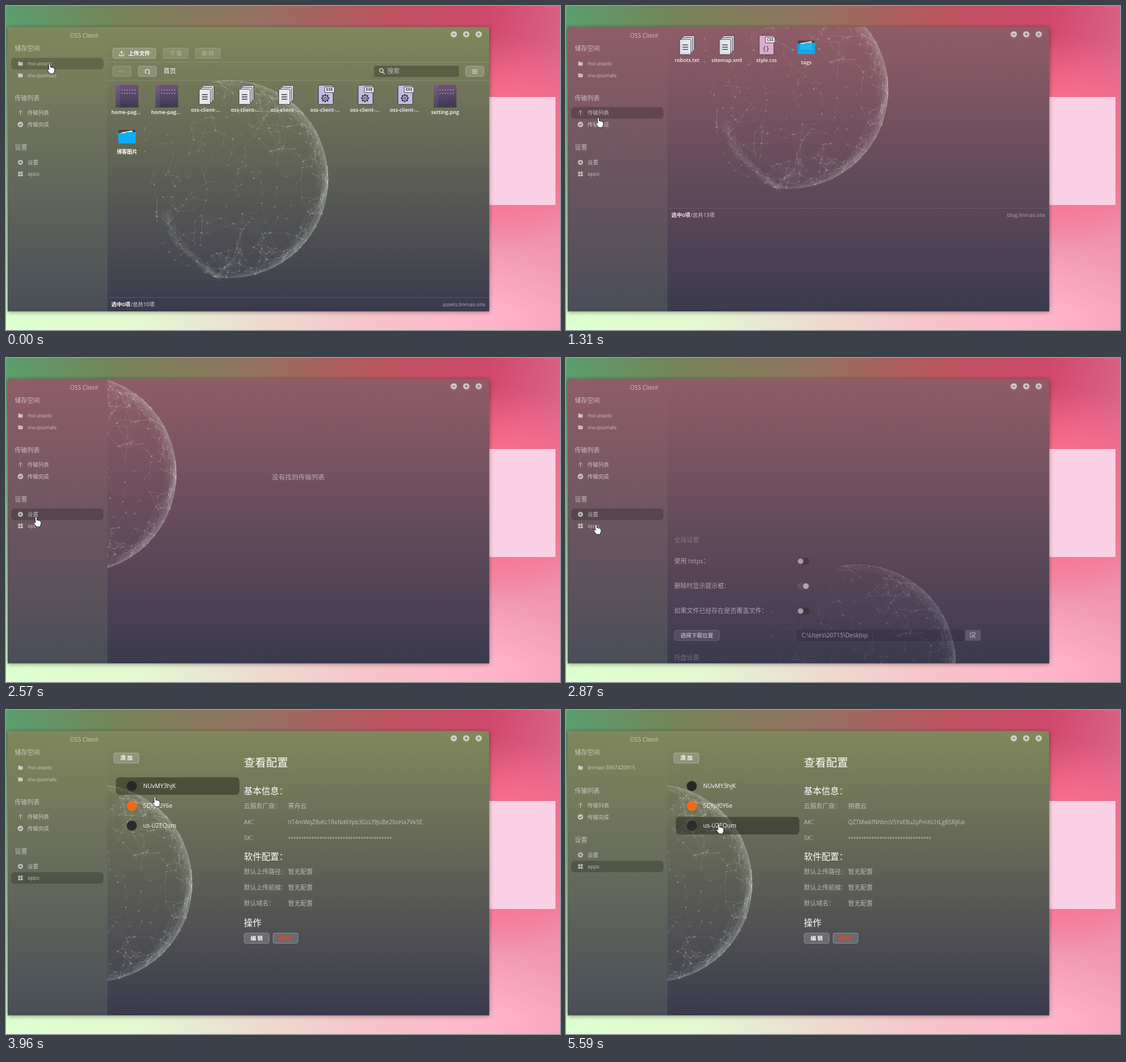
Animation, 978 px wide and 573 px high, one loop 5990 ms. Source, as an HTML page with a canvas:

```html
<!DOCTYPE html>
<html lang="zh">
<head>
<meta charset="utf-8">
<title>OSS Client</title>
<style>
html, body { margin: 0; width: 100%; height: 100%; overflow: hidden; }
canvas { display: block; }
</style>
</head>
<body>
<canvas id="stage" width="978" height="573"></canvas>
<script>
const W = 978, H = 573, LOOP = 5990;
const WIN = { x: 3, y: 37, w: 850, h: 503 }, SIDE = 179;
const OLIVE = '#81875c', RED = '#8f5d68', PURPLE = '#805b88';
const screen = document.getElementById('stage').getContext('2d');
let ctx = screen;

const white = a => `rgba(255,255,255,${a})`;
const black = a => `rgba(0,0,0,${a})`;

function layer(w, h, paint) {
  const c = document.createElement('canvas');
  c.width = w;
  c.height = h;
  paint(c.getContext('2d'));
  return c;
}

function random(seed) {
  return () => {
    seed = (seed + 0x6D2B79F5) | 0;
    let v = Math.imul(seed ^ (seed >>> 15), 1 | seed);
    v = (v + Math.imul(v ^ (v >>> 7), 61 | v)) ^ v;
    return ((v ^ (v >>> 14)) >>> 0) / 4294967296;
  };
}

function ramp(grad, stops) {
  stops.forEach(([p, c]) => grad.addColorStop(p, c));
  return grad;
}

// CSS "ease"
function ease(x) {
  if (x <= 0) return 0;
  if (x >= 1) return 1;
  let lo = 0, hi = 1;
  const curve = (u, a, b) => 3 * (1 - u) * (1 - u) * u * a + 3 * (1 - u) * u * u * b + u * u * u;
  for (let i = 0; i < 18; i++) {
    const mid = (lo + hi) / 2;
    if (curve(mid, .25, .25) < x) lo = mid; else hi = mid;
  }
  return curve(lo, .1, 1);
}

function text(str, x, y, size, color = '#fff', align = 'left', weight = 400) {
  ctx.font = `${weight} ${size}px "Open Sans","Noto Sans CJK SC","Noto Sans CJK",sans-serif`;
  ctx.textAlign = align;
  ctx.fillStyle = color;
  ctx.fillText(str, x, y + size * .36);
}

function box(x, y, w, h, r, fill, stroke) {
  ctx.beginPath();
  ctx.roundRect(x, y, w, h, r);
  if (fill) { ctx.fillStyle = fill; ctx.fill(); }
  if (stroke) { ctx.strokeStyle = stroke; ctx.lineWidth = 1; ctx.stroke(); }
}

function dot(x, y, r, fill) {
  ctx.beginPath();
  ctx.arc(x, y, r, 0, 7);
  ctx.fillStyle = fill;
  ctx.fill();
}

function path(d, x, y, { fill, stroke, width = 1 }) {
  ctx.save();
  ctx.translate(x, y);
  const p = new Path2D(d);
  ctx.lineJoin = ctx.lineCap = 'round';
  if (fill) { ctx.fillStyle = fill; ctx.fill(p); }
  if (stroke) { ctx.strokeStyle = stroke; ctx.lineWidth = width; ctx.stroke(p); }
  ctx.restore();
}

function button(x, y, w, label, color = '#fff', on = true) {
  box(x + .5, y + .5, w - 1, 18, 3, white(on ? .16 : .1), white(on ? .3 : .2));
  if (label) text(label, x + w / 2, y + 9.5, 9.6, color, 'center', on ? 600 : 400);
}

function gear(x, y, r, color, hole, inner = .36) {
  for (let i = 0; i < 8; i++) {
    ctx.save();
    ctx.translate(x, y);
    ctx.rotate(i * Math.PI / 4);
    ctx.fillStyle = color;
    ctx.fillRect(-r * .2, -r, r * .4, r);
    ctx.restore();
  }
  dot(x, y, r * .78, color);
  dot(x, y, r * inner, hole);
}

const wallpaper = layer(W, H, g => {
  g.fillStyle = ramp(g.createLinearGradient(0, 0, W, 0), [
    [0, '#5a9f6c'], [.2, '#74835a'], [.46, '#95705f'], [.7, '#bd515f'], [.87, '#cf486a'], [1, '#da6084']]);
  g.fillRect(0, 0, W, H);
  const low = layer(W, H, b => {
    b.fillStyle = ramp(b.createLinearGradient(0, 0, W, 0), [
      [0, '#dcffd0'], [.24, '#e4f8d2'], [.45, '#ecdcd2'], [.66, '#f8c3ca'], [.87, '#ffb4ca'], [1, '#f7a7bf']]);
    b.fillRect(0, 0, W, H);
    b.globalCompositeOperation = 'destination-in';
    b.fillStyle = ramp(b.createLinearGradient(0, 0, 0, H), [
      [0, black(0)], [.1, black(.03)], [.5, black(.45)], [.94, black(1)], [1, black(1)]]);
    b.fillRect(0, 0, W, H);
  });
  g.drawImage(low, 0, 0);
  g.fillStyle = ramp(g.createRadialGradient(880, 240, 30, 880, 240, 190), [
    [0, 'rgba(255,125,155,.9)'], [.5, 'rgba(255,110,140,.6)'], [1, 'rgba(255,100,135,0)']]);
  g.fillRect(680, 40, W - 680, 420);
  g.fillStyle = '#fbd0e4';
  g.fillRect(779, 161, 191, 191);
});

const globe = layer(440, 440, g => {
  const rnd = random(41), R = 175, pts = [];
  g.translate(220, 220);
  const tint = a => `rgba(225,230,225,${a})`;
  const line = (x1, y1, x2, y2, a) => {
    g.strokeStyle = tint(a);
    g.lineWidth = .7;
    g.beginPath();
    g.moveTo(x1, y1);
    g.lineTo(x2, y2);
    g.stroke();
  };
  const rim = (r, width, a, from, to) => {
    g.strokeStyle = tint(a);
    g.lineWidth = width;
    g.beginPath();
    g.arc(0, 0, r, from, to);
    g.stroke();
  };

  for (let i = 0; i < 470; i++) {
    const z = rnd(), a = rnd() * Math.PI * 2, r = R * Math.sqrt(1 - z * z);
    const x = r * Math.cos(a), y = r * Math.sin(a), keep = rnd();
    if (x < -152 || (x < -25 && y < 60 && r > 142 && keep > .12)) continue;
    if (x < -60 && y >= 60 && r > 150 && keep > .25) continue;
    if (x < 0 && keep > .75) continue;
    pts.push([x, y]);
  }
  pts.forEach(([x, y], i) => {
    for (let j = 0; j < i; j++) {
      const d = Math.hypot(x - pts[j][0], y - pts[j][1]);
      if (d < 36 && rnd() < .42) line(x, y, ...pts[j], .17 - d * .0022);
    }
    g.fillStyle = tint(.12 + rnd() * .22);
    g.beginPath();
    g.arc(x, y, .8 + rnd() * .8, 0, 7);
    g.fill();
  });

  // soft crescent along the right edge
  g.shadowColor = white(.4);
  g.shadowBlur = 18;
  rim(R - 1, 1.6, .22, -1.75, 1.75);
  g.shadowBlur = 6;
  rim(R - 3, 5, .1, -1.3, 1.5);
  rim(R - 6, 11, .07, -.95, 1.15);
  g.shadowBlur = 0;
  for (let i = 0; i < 420; i++) {
    const a = -1.75 + rnd() * 3.5, b = a + (rnd() - .5) * .26, thick = 6 + 16 * Math.cos(a * .75);
    const r = R - rnd() * thick, q = R - rnd() * thick;
    line(r * Math.cos(a), r * Math.sin(a), q * Math.cos(b), q * Math.sin(b), .11);
  }
  // ragged lower left edge
  const edge = u => {
    const v = 1 - u, s = 14 - u * 4;
    return [-119 * v * v - 206 * u * v - 22 * u * u + (rnd() - .3) * s * 1.6,
      58 * v * v + 246 * u * v + 176 * u * u + (rnd() - .6) * s];
  };
  for (let i = 0; i < 190; i++) {
    const u = rnd();
    line(...edge(u), ...edge(Math.min(1, u + rnd() * .14)), .14);
  }
});

const drawGlobe = x => ctx.drawImage(globe, x - 220, 86);

const icons = {
  thumb(x, y) {
    ctx.fillStyle = ramp(ctx.createLinearGradient(0, y - 20, 0, y + 20), [[0, '#71507c'], [1, '#3b394d']]);
    ctx.fillRect(x - 20, y - 20, 40, 40);
    ctx.fillStyle = white(.07);
    ctx.fillRect(x - 20, y - 20, 8, 40);
    for (let i = 0; i < 12; i++) {
      ctx.fillStyle = i % 3 ? white(.45) : '#4ab4e0';
      ctx.fillRect(x - 10 + (i % 6) * 4.6, y - 12 + Math.floor(i / 6) * 6, 2, 2);
    }
  },
  stack(x, y) {
    for (let i = 2; i >= 0; i--) box(x - 13 + i * 3, y - 10 - i * 3.2, 20, 27, 1.5, '#e6e8ee', '#33343f');
    for (let i = 0; i < 3; i++) {
      ctx.fillStyle = '#33343f';
      ctx.fillRect(x - 8, y - 1 + i * 4, 10, 1.5);
    }
  },
  card(x, y, fill, tag) {
    box(x - 13, y - 17, 26, 34, 1.5, fill, '#33343f');
    box(x - 2, y - 14, 17, 10, 1, '#f2f2f6', '#33343f');
    text(tag, x + 6.5, y - 9, 6.5, '#22222c', 'center', 700);
  },
  exe(x, y) {
    const fill = '#c8bce0';
    icons.card(x, y, fill, 'EXE');
    gear(x - 1, y + 6, 7, '#33343f', fill, .6);
    dot(x - 1, y + 6, 2.5, '#33343f');
    dot(x - 1, y + 6, 1.4, fill);
  },
  css(x, y) {
    icons.card(x, y, '#e3b6d6', 'CSS');
    text('{ }', x - 1, y + 6, 10, '#33343f', 'center', 600);
  },
  folder(x, y) {
    box(x - 15, y - 12, 30, 20, 1.5, '#4a4046');
    path('M-11-7L9-11L12 4H-11Z', x, y, { fill: '#f4f4f4' });
    path('M-16-6H-4L-1-8H16L15 12H-15Z', x, y, { fill: '#0baef5' });
  }
};

const staticFiles = [
  ['home-pag...', 'thumb'], ['home-pag...', 'thumb'],
  ...Array(3).fill(['oss-client-...', 'stack']),
  ...Array(3).fill(['oss-client-...', 'exe']),
  ['setting.png', 'thumb'], ['博客图片', 'folder']
];
const blogFiles = [
  ['404.html', 'stack'], ['about', 'folder'], ['archives', 'folder'], ['categories', 'folder'],
  ['css', 'folder'], ['images', 'folder'], ['index.html', 'stack'], ['js', 'folder'], ['page', 'folder'],
  ['robots.txt', 'stack'], ['sitemap.xml', 'stack'], ['style.css', 'css'], ['tags', 'folder']
];

function filesPage(t) {
  const blog = t >= 750, files = blog ? blogFiles : staticFiles;
  drawGlobe(394);
  button(188, 74, 77);
  text('上传文件', 216, 83.5, 9.6, '#fff', 'left', 600);
  path('M0 2V-4M-2.5-1.5L0-4L2.5-1.5M-4 1V4H4V1', 204, 84, { stroke: '#fff' });
  button(277, 74, 45, '下 载', white(.35), false);
  button(334, 74, 45, '删 除', white(.35), false);
  button(188, 106, 33, '', '#fff', false);
  path('M4 0H-4M-1.5-2.5L-4 0L-1.5 2.5', 204, 116, { stroke: white(.25) });
  button(233, 106, 33);
  path('M-2 3.2A3.8 3.8 0 1 1 2 3.2M2 3.6H4', 249.5, 116, { stroke: white(.9), width: 1.2 });
  text('首页', 278, 115.5, 11, '#fff', 'left', 500);
  box(650, 106, 149, 19, 3, black(.24), black(.12));
  path('M3 0A3.3 3.3 0 1 1 3 -.1M1.8 2.6L5 6', 663, 114, { stroke: white(.8), width: 1.4 });
  text('搜索', 673, 115.5, 11, white(.6));
  button(811, 106, 33);
  path('M-4-3H4M-4 0H4M-4 3H4', 827.5, 116, { stroke: white(.9) });
  ctx.fillStyle = white(.13);
  for (const y of [99, 131, 515]) ctx.fillRect(SIDE, y, 674, 1);

  files.forEach(([name, kind], i) => {
    const x = 213.6 + (i % 9) * 70.2, y = 157 + Math.floor(i / 9) * 70;
    const tall = kind === 'thumb' || kind === 'folder', cut = name.endsWith('...');
    icons[kind](x, y + (kind === 'thumb' ? 2.5 : kind === 'folder' ? 4 : 0));
    text(name, cut ? x - 27.5 : x, y + (tall ? 31 : 27), 9.1, '#fff', cut ? 'left' : 'center', 600);
  });
  text('选中0项', 186, 528, 9.4, '#fff', 'left', 600);
  text(`/总共${files.length}项`, 220, 528, 9.4, white(.85));
  text(blog ? 'blog.linmao.site' : 'assets.linmao.site', 846, 528, 9.1, white(.6), 'right');
}

function emptyPage() {
  drawGlobe(126);
  text('没有找到传输列表', 516, 312, 11.7, white(.55), 'center');
}

function toggle(y, on) {
  box(408, y - 6, 22, 12, 6, on ? white(.14) : black(.35));
  dot(on ? 423.5 : 414, y, 5, '#f4f4f0');
}

function settingsPage() {
  drawGlobe(513);
  [['全局设置', 88], ['托盘设置', 296], ['悬浮窗设置', 415]].forEach(([s, y]) => text(s, 191, y, 11, white(.48)));
  [['使用 https：', 125, 0], ['删除时显示提示框：', 169, 1], ['如果文件已经存在是否覆盖文件：', 213, 0],
    ['传输完成后是否提示：', 341, 1], ['复制url或者markdown格式：', 378.5, 1], ['是否显示悬浮窗：', 459.5, 1]
  ].forEach(([s, y, on]) => {
    text(s, 191, y, 11);
    toggle(y + .5, on);
  });
  button(191, 247, 80, '选择下载位置');
  box(408.5, 247.5, 296, 18, 2, black(.22), black(.25));
  text('C:\\Users\\20715\\Desktop', 416, 256.5, 10.3);
  box(704, 247, 28, 19, 2, white(.28));
  path('M4-1V-4H-4V4H-1M0 0L4.5 4.5M0 3.5V0H3.5', 718, 256, { stroke: '#fff', width: 1.1 });
  text('悬浮窗样式：', 191, 496.5, 11);
  dot(414, 497, 6.2, '#ecece6');
  text('圆形', 426, 496.5, 11);
  dot(467, 497, 6.2, '#fff');
  dot(467, 497, 4.1, '#2f7fd3');
  text('椭圆形', 479, 496.5, 11);
}

const apps = [
  { name: 'NUvMY3hjK', logo: '#262824', maker: '霁舟云', key: 'hT4mWqZ8vKc1RxNd6Ypb3GsLf9JuBe2XoHa7Vk5E', stars: 40, buckets: ['mo-assets', 'mo-journals'] },
  { name: '5CYpf0Y6e', logo: '#f0691c', maker: '岚栖云', key: 'KXQM7RdWvn3HB2TcPf46s9uZ', stars: 30, buckets: ['shuyingting-notes-app'] },
  { name: 'us-UZEOum', logo: '#2b2d2c', maker: '朔鹿云', key: 'QZTMwkfNhbrcV5YxE8u2yPmXs1tLgBSRjKai', stars: 32, buckets: ['linmao-3067420915'] }
];

function appsPage(t) {
  const pick = t < 4585 ? 0 : t < 5440 ? 1 : 2, app = apps[pick], dim = white(.58);
  drawGlobe(154);
  button(190, 75.5, 45, '添 加');
  box(194, 119 + pick * 35, 218, 31, 6, black(.35));
  apps.forEach((a, i) => {
    dot(222, 134.5 + i * 35, 9, a.logo);
    text(a.name, 242, 134.5 + i * 35, 10.5, '#fff', 'left', 500);
  });
  text('查看配置', 420, 93, 19.5);
  [['基本信息：', 143], ['软件配置：', 259.5], ['操作', 376]].forEach(([s, y]) => text(s, 420, y, 15.5));
  const none = '暂无配置';
  [['云服务厂商：', app.maker, 170.5], ['AK：', app.key, 198.5], ['SK：', '', 226.5],
    ['默认上传路径：', none, 286.5], ['默认上传前缀：', none, 314.5], ['默认域名：', none, 342.5]
  ].forEach(([label, value, y]) => {
    text(label, 420, y, 10.9, dim);
    text(value, 498, y, value === app.key ? 10.1 : 10.9, dim);
  });
  text('*'.repeat(app.stars), 498, 228, 8.3, dim);
  button(420, 394, 45, '编 辑');
  button(471, 394, 45, '删 除', '#e2452b');
}

const routes = [
  { at: -1000, T: 1, sel: 0, theme: OLIVE, page: filesPage },
  { at: 1275, T: 168, sel: 2, theme: RED, page: emptyPage },
  { at: 1943, T: 215, sel: 3, theme: PURPLE, page: emptyPage },
  { at: 2529, T: 260, sel: 4, theme: RED, page: settingsPage },
  { at: 3369, T: 220, sel: 5, theme: OLIVE, page: appsPage }
];

const marks = [
  (x, y) => path('M-4-3.5H-1L0-2.5H4V3.5H-4Z', x, y, { fill: white(.6) }),
  (x, y) => path('M0 4V-4M-3.5-.5L0-4L3.5-.5', x, y, { stroke: white(.6) }),
  (x, y, bg) => {
    dot(x, y, 4.8, white(.62));
    path('M-2 0L-.5 1.6L2.2-1.4', x, y, { stroke: bg, width: 1.2 });
  },
  (x, y, bg) => gear(x, y, 4.8, '#c3c2ba', bg),
  (x, y) => {
    ctx.fillStyle = white(.62);
    for (const [i, j] of [[-4, -4], [.5, -4], [-4, .5], [.5, .5]]) ctx.fillRect(x + i, y + j, 3.6, 3.6);
  }
];

function sidebar(t, route) {
  const app = t < 4735 ? 0 : t < 5590 ? 1 : 2, buckets = apps[app].buckets;
  const up = app ? 20.3 : 0, bg = '#63625c';
  const sel = route.sel === 0 && t >= 600 ? 1 : route.sel;
  const item = (id, label, mark, y, size) => {
    if (id === sel) box(9, y - 10.3, 163, 20.5, 6, black(.2));
    mark(25.5, y, bg);
    text(label, 38, y, size, white(.62));
  };
  text('OSS Client', 113, 52, 10.4, white(.6));
  text('储存空间', 15.5, 75.5, 11, white(.6));
  text('传输列表', 15.5, 163 - up, 11, white(.6));
  text('设置', 15.5, 250.5 - up, 11, white(.6));
  buckets.forEach((b, i) => item(i, b, marks[0], 102 + i * 20.4, 9.1));
  item(2, '传输列表', marks[1], 189 - up, 9.5);
  item(3, '传输完成', marks[2], 209.5 - up, 9.5);
  item(4, '设置', marks[3], 276.5 - up, 9.5);
  item(5, 'apps', marks[4], 297 - up, 9.3);
}

function shade(x, w, top, bottom) {
  ctx.fillStyle = ramp(ctx.createLinearGradient(0, WIN.y, 0, WIN.y + WIN.h), [[0, top], [1, bottom]]);
  ctx.fillRect(x, WIN.y, w, WIN.h);
}

function slide(page, t, dy, alpha) {
  ctx.save();
  ctx.beginPath();
  ctx.rect(SIDE, WIN.y, WIN.x + WIN.w - SIDE, WIN.h);
  ctx.clip();
  ctx.translate(0, Math.round(dy));
  ctx.globalAlpha = alpha;
  page(t);
  ctx.restore();
}

// time, x, y of the pointer tip
const trail = [
  [0, 77, 102], [300, 68, 115], [600, 68, 115], [975, 56, 195], [1240, 56, 195], [1310, 57, 197],
  [1610, 58, 210], [1935, 58, 210], [2010, 58, 214], [2385, 53, 277], [2490, 53, 277], [2870, 53, 294],
  [3340, 53, 295], [3415, 53, 296], [3865, 262, 148], [4335, 266, 173], [4585, 266, 173], [4810, 269.5, 201], [LOOP, 269.5, 201]
];
const clicks = [[450, 600], [1140, 1310], [1860, 2010], [4510, 4585], [5290, 5440]];

function pointer(t) {
  const i = trail.findIndex(p => p[0] > t), [t0, x0, y0] = trail[i - 1], [t1, x1, y1] = trail[i];
  const k = (t - t0) / (t1 - t0), x = x0 + (x1 - x0) * k, y = y0 + (y1 - y0) * k;
  path('M-1.6 1.2Q0-.8 1.6 1.2V6.2Q3.4 5.4 4.2 6.8Q6 6.2 6.8 7.6Q9 7.4 9 9.4V12.5Q8.6 15 7.6 16.2V18H-.2V16.6Q-2.6 14.4-4.4 10.8Q-4.4 8.6-1.6 10.6Z',
    x, y, { fill: '#fff', stroke: '#15151a' });
  if (clicks.some(([a, b]) => t >= a && t < b)) dot(x, y, 9.3, 'rgba(255,255,0,.45)');
}

// motion advances in 75 ms ticks within each burst
const bursts = [0, 450, 600, 1140, 1310, 1860, 2010, 2570, 3340, 3960, 4510, 5290, 5440, 5590];
function tick(t) {
  const start = bursts.filter(b => b <= t).pop();
  return start + Math.floor((t - start) / 75) * 75;
}

function draw(t) {
  const n = routes.filter(r => r.at <= t).length - 1, route = routes[n];
  const phase = (t - route.at) / route.T;
  ctx.drawImage(wallpaper, 0, 0);
  ctx.save();
  ctx.shadowColor = black(.45);
  ctx.shadowBlur = 7;
  ctx.shadowOffsetY = 1;
  ctx.fillStyle = '#55555a';
  ctx.fillRect(WIN.x, WIN.y, WIN.w, WIN.h);
  ctx.restore();
  shade(WIN.x, WIN.w, route.theme, '#3b3a4e');
  shade(WIN.x, SIDE - WIN.x, route.theme, '#494e58');

  if (phase < 1) {
    const p = ease(phase);
    slide(routes[n - 1].page, t, -WIN.h * p, 1 - p * p);
  } else {
    const p = ease(phase - 1);
    slide(route.page, t, WIN.h * (1 - p), p);
  }
  sidebar(t, route);
  ['M-2 0H2', 'M-2 0H2M0-2V2', 'M-1.6-1.6L1.6 1.6M1.6-1.6L-1.6 1.6'].forEach((d, i) => {
    dot(790.5 + i * 22, 50, 5.6, white(.62));
    path(d, 790.5 + i * 22, 50, { stroke: '#55504c' });
  });
  pointer(t);
}

function frame(now) {
  draw(tick(now % LOOP));
  requestAnimationFrame(frame);
}
requestAnimationFrame(frame);
</script>
</body>
</html>
```
